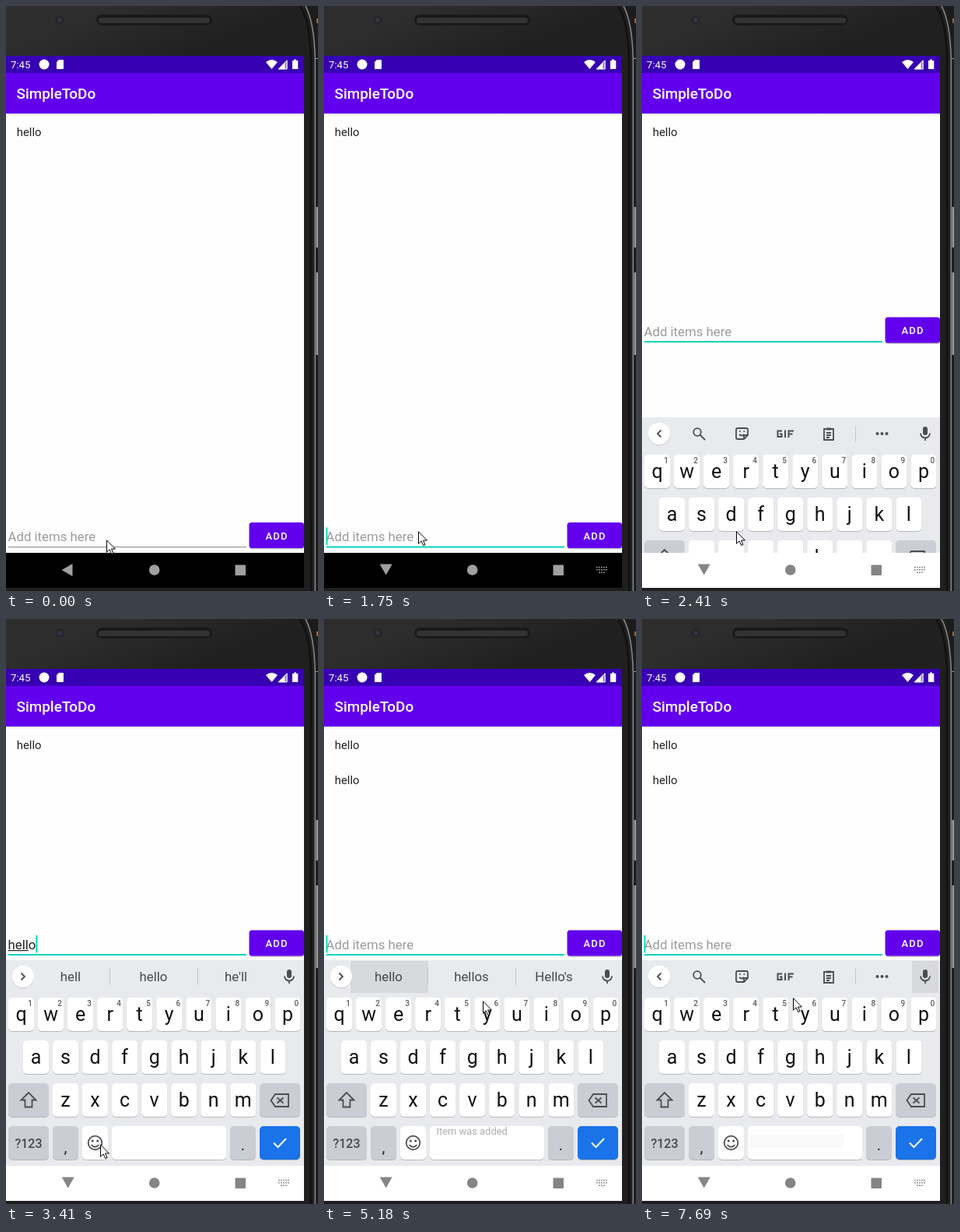
An HTML page for the animation above (8000 ms loop, 401 px wide and 751 px high).

```html
<!DOCTYPE html>
<html lang="en">
<head>
<meta charset="utf-8">
<title>To-do list on a phone</title>
<style>
html, body { margin: 0; width: 100%; height: 100%; overflow: hidden; background: #121212; }
svg { display: block; width: 401px; height: 751px; font-family: Roboto, sans-serif; }
.mid { text-anchor: middle; }
.line { fill: none; stroke: #4a4d51; stroke-width: 1.8; }
</style>
</head>
<body>
<svg id="stage" viewBox="0 0 401 751">
  <defs>
    <linearGradient id="body" gradientUnits="userSpaceOnUse" x1="217" y1="-33" x2="254" y2="55">
      <stop stop-color="#2d2d2d"/><stop offset="1" stop-color="#202020"/>
    </linearGradient>
    <linearGradient id="shade" x2="0" y2="1">
      <stop stop-color="#000" stop-opacity=".14"/><stop offset="1" stop-color="#000" stop-opacity="0"/>
    </linearGradient>
    <clipPath id="screen"><path d="M0 64H383V702H0z"/></clipPath>
    <clipPath id="button"><rect x="312.500" y="663" width="70.500" height="33" rx="3.5"/></clipPath>
  </defs>

  <g id="phone">
    <path fill="#1c1c1c" d="M0 0H401V751H0z"/>
    <path fill="url(#body)" d="M0 0H384C392 14 396 34 397 68V751H0z"/>
    <path fill="#1f1f1f" d="M383 64H391V751H383zM0 747H391V751H0z"/>
    <path fill="none" stroke="#111" stroke-width="2.500" d="M378 0C387 14 391 34 392 68V751"/>
    <path fill="none" stroke="#858585" stroke-width="1.600" d="M385 0C392.500 14 396.500 34 397.300 68V751"/>
    <path fill="#9a9a9a" d="M398.500 258H401V310H398.500zM398.500 342H401V448H398.500zM398 67H401V68H398z"/>
    <path fill="#a8642c" d="M399 16H401V22H399z"/>
    <rect x="116" y="11" width="149" height="14" rx="7" fill="#191919"/>
    <rect x="119" y="15" width="143" height="7" rx="3.5" fill="#333"/>
    <circle cx="69" cy="18" r="6" fill="#272729"/><circle cx="69" cy="18" r="2.500" fill="#36384a"/>
  </g>

  <g id="app">
    <path fill="#fefefe" d="M0 138H383V702H0z"/>
    <path fill="url(#shade)" d="M0 138H383V141H0z"/>
    <path fill="#6200ee" d="M0 86H383V138H0z"/>
    <path fill="#3700b3" d="M0 64H383V86H0z"/>
    <g fill="#fff">
      <text x="6" y="80" font-size="13.2">7:45</text>
      <circle cx="49" cy="75" r="6.5"/>
      <path d="M68 69H73Q74 69 74 70V80Q74 81 73 81H66Q65 81 65 80V72z"/>
      <path d="M334 72Q341.500 66 349 72L341.500 81z"/>
      <path d="M362 69V81H350z" opacity=".45"/><path d="M358.500 72.500V81H350z"/><path d="M361 70V81H350z" fill="none" stroke="#fff"/>
      <path d="M368 70H370.200V68.500H373V70H375.300V81H368z"/>
      <text x="13.500" y="119.200" font-size="18.9" font-weight="500">SimpleToDo</text>
    </g>
    <g font-size="14.9" fill="#222">
      <text x="13.700" y="166.700">hello</text>
      <text id="added" x="13.700" y="211.700">hello</text>
    </g>
  </g>

  <g id="entry" font-size="16.8">
    <text id="hint" x="2.500" y="687" fill="#9b9b9b">Add items here</text>
    <text id="typed" x="2.500" y="687" fill="#222"></text>
    <path id="under" fill="#222" d="M0 688.500H1V689.700H0z"/>
    <path id="rule" d="M3 694.500H309"/>
    <path id="caret" fill="#03dac5" d="M2.500 669.500H4.500V692H2.500z"/>
    <rect x="313" y="664.500" width="70" height="33" rx="3.5" fill="#000" opacity=".2"/>
    <rect x="312.500" y="663" width="70.500" height="33" rx="3.5" fill="#6200ee"/>
    <circle id="ripple" cx="342" cy="682" fill="#fff" clip-path="url(#button)"/>
    <text class="mid" x="348.100" y="684.500" font-size="13" font-weight="500" letter-spacing="1.17" fill="#fff">ADD</text>
  </g>

  <g clip-path="url(#screen)"><g id="board">
    <path fill="#e8eaed" d="M0 438H383V702H0z"/>
    <g id="keys"></g>
    <g id="words">
      <path id="pick" fill="#d7d9dc" d="M34 439H134V480H34z"/>
      <path stroke="#c3c6ca" d="M133.500 448V470M246.500 448V470"/>
      <g id="guess" class="mid" font-size="16.8" fill="#45484c"></g>
    </g>
    <g id="tools">
      <path fill="#d7d9dc" d="M347 439H381V480H347z"/>
      <path stroke="#c3c6ca" d="M274.500 449V469"/>
      <g class="line">
        <circle cx="71" cy="457" r="4.8"/><path d="M74.500 460.500L81 467"/>
        <path d="M123 452H134Q136 452 136 454V461L131 466H123Q121 466 121 464V454Q121 452 123 452zM136 461H131V466M125 460Q128 463 131 460M125 456H126.500M130.500 456H132"/>
        <path d="M234 453H246V467H234zM237 458H243M237 461H243M237 464H241"/>
        <path stroke-width="3" d="M237 453H243"/>
        <path stroke-width="2" d="M180 455.500H174.500V463H179.500V459.500H177M184 454.500V464M188.500 464V455.500H195M188.500 459.500H193.500"/>
      </g>
      <g fill="#4a4d51"><circle cx="302.500" cy="459" r="2"/><circle cx="308.500" cy="459" r="2"/><circle cx="314.500" cy="459" r="2"/></g>
    </g>
    <circle cx="22" cy="460" r="14.200" fill="#000" opacity=".12"/>
    <circle cx="22" cy="459" r="14" fill="#fff"/>
    <path id="chevron" class="line" d="M19.500 454.500L24 459L19.500 463.500"/>
    <rect x="361" y="450" width="6" height="11" rx="3" fill="#4a4d51"/>
    <path class="line" stroke-width="1.600" d="M358 458.500A6 6 0 0 0 370 458.500M364 464.500V468"/>
    <text id="toast" x="144.500" y="661.500" font-size="12.900" fill="#777">Item was added</text>
  </g></g>

  <g id="nav">
    <path id="bar" d="M0 702H383V747H0z"/>
    <path id="back" d="M71.500 724L85.500 716V732z"/>
    <circle cx="190.700" cy="724" r="6.800"/>
    <rect x="294.500" y="717.500" width="13.500" height="13.500" rx=".8"/>
    <path id="switch" fill="none" stroke-width="1.600" stroke-dasharray="1.800 1.200" d="M350 720.500H364M350 723.800H364M353 727.300H361"/>
  </g>

  <path id="mouse" fill="#fff" stroke="#000" stroke-linejoin="miter" d="M.5 .8V16.200L4.100 12.800L6.700 18.500L9 17.500L6.500 12H11.400z"/>
</svg>

<script>
const LOOP = 8000;
const $ = id => document.getElementById(id);

function add(parent, tag, attrs, text) {
  const el = document.createElementNS('http://www.w3.org/2000/svg', tag);
  for (const k in attrs) el.setAttribute(k, attrs[k]);
  if (text) el.textContent = text;
  parent.appendChild(el);
  return el;
}

// Keyboard
const WHITE = '#fff', GREY = '#cacdd3', BLUE = '#1a73e8', PITCH = 38.05;
const keys = $('keys');

function key(x, y, w, fill) {
  add(keys, 'rect', { x, y: y + 1, width: w, height: 43, rx: 5, fill: '#000', opacity: .22 });
  add(keys, 'rect', { x, y, width: w, height: 43, rx: 5, fill });
}
function label(x, y, size, fill, text, weight = 400) {
  add(keys, 'text', { x, y, class: 'mid', 'font-size': size, fill, 'font-weight': weight }, text);
}
function row(letters, x0, y) {
  [...letters].forEach((c, i) => {
    const x = x0 + i * PITCH;
    key(x, y, 33, WHITE);
    label(x + 16.5, y + 29.5, 25, '#111', c);
    if (y === 486) label(x + 28, y + 10.5, 10, '#5a5d61', String((i + 1) % 10), 500);
  });
}
row('qwertyuiop', 3, 486);
row('asdfghjkl', 22, 541);
row('zxcvbnm', 60, 596);
[[3, 596, 52, GREY], [326, 596, 52, GREY], [3, 651, 52, GREY], [60, 651, 33, GREY], [98, 651, 33, WHITE],
 [136, 651, 147, WHITE], [288, 651, 33, GREY], [326, 651, 52, BLUE]].forEach(k => key(...k));
label(29, 679, 16, '#45484c', '?123', 500);
label(76.5, 685, 20, '#222', ',');
label(304.5, 682, 20, '#222', '.');
const icon = (d, more) => add(keys, 'path', { class: 'line', d, ...more });
icon('M29 608L19.500 617.500H24.500V626.500H33.500V617.500H38.500z');
icon('M346 610H363V626H346L340.500 618zM348.500 614.500L356.500 621.500M356.500 614.500L348.500 621.500');
icon('M344 672.500L349.500 678L360 667', { style: 'stroke:#fff;stroke-width:2' });
icon('M105.700 672.500A8.800 8.800 0 1 0 123.300 672.500A8.800 8.800 0 1 0 105.700 672.500M109.500 675Q114.500 680.500 119.500 675');
for (const cx of [111.3, 117.7]) add(keys, 'circle', { cx, cy: 670, r: 1.5, fill: '#4a4d51' });
const ghost = add(keys, 'rect', { x: 136, y: 662, width: 123, height: 17, fill: '#f9f9f9' });

const guesses = [83, 189.5, 295.5].map(x => add($('guess'), 'text', { x, y: 465.3 }));

// Tracks hold [time, value] steps
const at = (track, t) => track.reduce((v, s) => s[0] <= t ? s[1] : v, track[0][1]);
const shown = (spans, t) => spans.some(([a, b]) => t >= a && t < b);

function glide(t0, t1, n, from, to) {
  return Array.from({ length: n }, (_, i) => {
    const p = (i + 1) / n, e = p * p * (3 - 2 * p);
    return [t0 + (t1 - t0) * i / (n - 1), from.map((v, k) => v + (to[k] - v) * e)];
  });
}

const mouse = [
  [0, [129, 685]],
  ...glide(160, 400, 3, [129, 685], [126, 680]),
  ...glide(890, 1130, 3, [126, 680], [121, 674]),
  ...glide(3550, 4270, 7, [121, 674], [338, 423]),
  [4390, [341, 418]], [5030, [215, 488]], [5180, [204, 490]],
  ...glide(6170, 6410, 3, [204, 490], [194, 486])
];
const text = [[0, ''], [2530, 'h'], [2780, 'he'], [2920, 'hel'], [3040, 'hell'], [3160, 'hello'], [4760, '']];
const marked = [[0, 0], [2920, 2], [3040, 3], [3160, 4], [3550, 5], [4760, 0]];
const caretOn = [[650, 1130], [1630, 2160], [2530, 3910], [4390, 5300], [5660, 6170], [6660, 7180], [7690, LOOP]];
const slide = [[0, 264], [2410, 90], [2530, 0]];
const words = [[0, ['hell', 'hello', "he'll"]], [3550, ['hello', 'hellos', "Hello's"]]];
const ripple = [[0, [0, 0]], [4640, [25, .16]], [4760, [46, .16]], [4880, [60, .08]], [5030, [0, 0]]];
const toast = [[0, 0], [5180, .6], [5300, .85], [5420, 1], [6790, .7], [6940, .4], [7060, .2], [7180, 0]];
const turn = [[0, 0], [1510, -30], [1630, -65], [1750, -90]];
const navFill = [[0, '#a0a0a0'], [2160, '#787878'], [2280, '#4f4f4f'], [2410, '#858585']];
const switchFade = [[0, 0], [1010, .5], [1130, 1]];

const pen = document.createElement('canvas').getContext('2d');
function widthOf(s) {
  pen.font = '16.8px Roboto, sans-serif';
  return pen.measureText(s).width;
}
const set = (id, attrs) => { for (const k in attrs) $(id).setAttribute(k, attrs[k]); };
const show = (el, on) => { el.style.display = on ? '' : 'none'; };

function draw(t) {
  const typed = at(text, t), focus = t >= 650;
  const tools = t < 3410 || t >= 5300;

  set('mouse', { transform: `translate(${at(mouse, t)})` });
  set('entry', { transform: `translate(0 ${t >= 2160 ? -263.5 : 0})` });
  set('rule', { stroke: focus ? '#03d3be' : '#8a8a8a', 'stroke-width': focus ? 1.8 : 1 });
  $('typed').textContent = typed;
  show($('hint'), !typed);
  set('under', { transform: `translate(2.5 0) scale(${widthOf(typed.slice(0, at(marked, t)))} 1)` });
  set('caret', { transform: `translate(${widthOf(typed)} 0)` });
  show($('caret'), shown(caretOn, t));
  const [r, glow] = at(ripple, t);
  set('ripple', { r, opacity: glow });
  show($('added'), t >= 5030);

  show($('board'), t >= 2410);
  set('board', { transform: `translate(0 ${at(slide, t)})` });
  show($('tools'), tools);
  show($('tools').firstElementChild, t >= 5300);
  show($('words'), !tools);
  show($('pick'), t >= 4640);
  at(words, t).forEach((w, i) => { guesses[i].textContent = w; });
  set('chevron', { transform: tools ? 'rotate(180 22 459)' : '' });
  set('toast', { opacity: at(toast, t) });
  show(ghost, t >= 7180);

  const fill = at(navFill, t);
  set('nav', { fill });
  set('bar', { fill: t >= 2410 ? '#fff' : '#000' });
  set('back', { transform: `rotate(${at(turn, t)} 78.85 723.15)` });
  set('switch', { stroke: fill, opacity: at(switchFade, t) });
}

const start = performance.now();
function tick(now) {
  draw(Math.max(0, now - start) % LOOP);
  requestAnimationFrame(tick);
}
draw(0);
requestAnimationFrame(tick);
</script>
</body>
</html>
```
